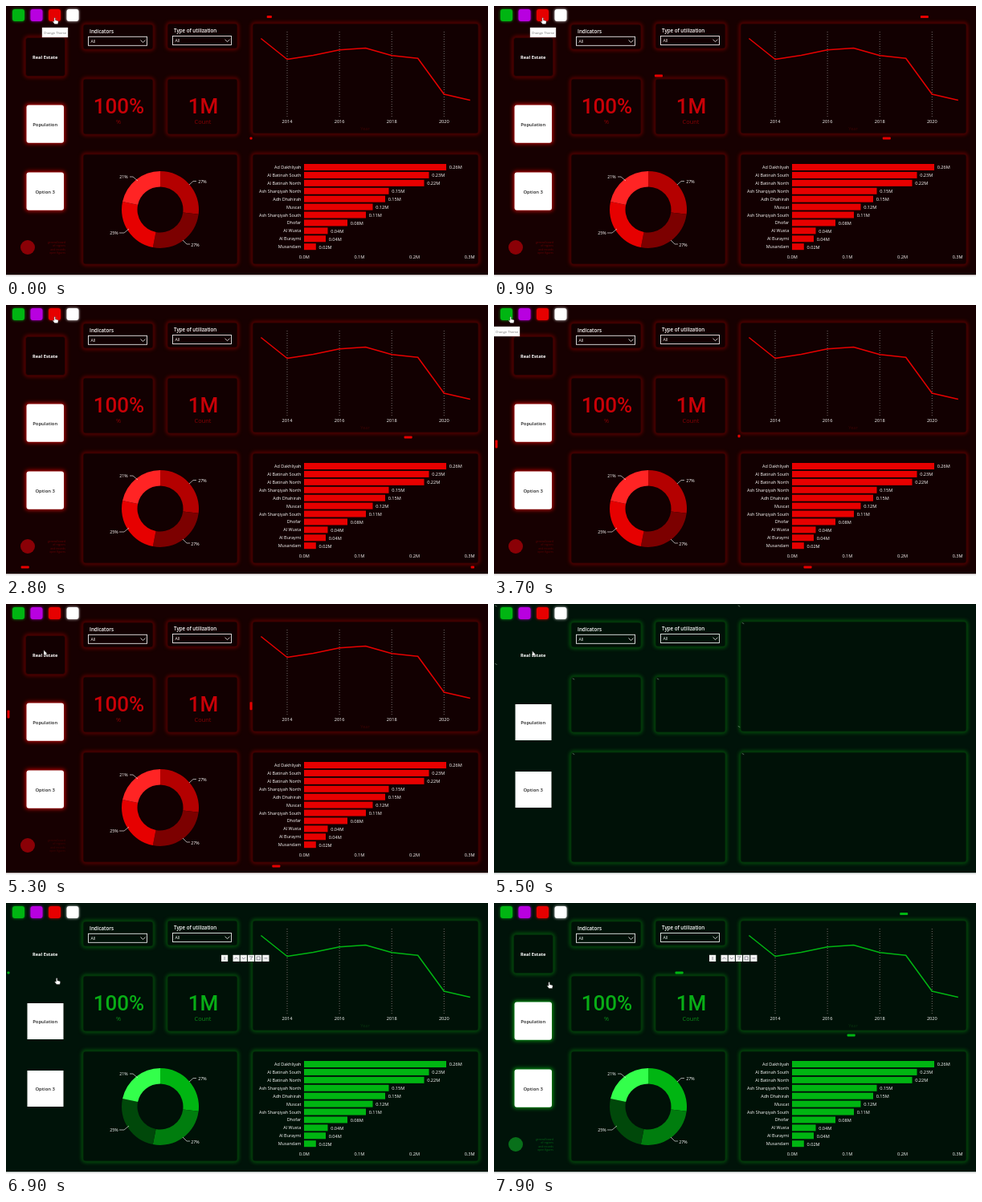
These frames come from a looping animation (600x338 px, 8000 ms). An HTML page:

```html
<!DOCTYPE html>
<html lang="en">
<head>
<meta charset="utf-8">
<title>Dashboard themes</title>
<style>
  html, body { margin: 0; width: 100%; height: 100%; overflow: hidden; background: #160001; }
  svg { display: block; width: 600px; height: 338px; font: 5.6px "Open Sans", "Noto Sans", sans-serif; }
  .red {
    --bg: #170001; --card: #120001; --glow: #6a0000; --edge: #380000; --main: #e60000;
    --kpi: #c90007; --dim: #860005; --faint: #3c0204; --tile: #e00000; --logo: #8a0006;
    --s0: #b40000; --s1: #7c0000; --s2: #e60000; --s3: #ff2424;
  }
  .green {
    --bg: #001309; --card: #001107; --glow: #045c0c; --edge: #033009; --main: #00b512;
    --kpi: #08ad16; --dim: #0a8a18; --faint: #06330e; --tile: #00b512; --logo: #08701a;
    --s0: #00b512; --s1: #007d0e; --s2: #00480a; --s3: #33ff4b;
  }
  text { fill: #fff; dominant-baseline: central; }
  .mid { text-anchor: middle; }
  .end { text-anchor: end; }
  .bold { font-weight: 600; }
  .glow { fill: none; stroke: var(--glow); stroke-width: 3.5; filter: blur(2.2px); }
  .card { fill: var(--card); stroke: var(--edge); stroke-width: .8; }
  .box { fill: none; stroke: #e8e8e8; stroke-width: .9; }
  .thin { fill: none; stroke: #ddd; stroke-width: .7; }
  .kpi { font: 500 26px Roboto, sans-serif; font-stretch: 80%; fill: var(--kpi); }
  .unit { font-size: 7.4px; fill: var(--dim); }
  .main { fill: var(--main); }
  .runner { fill: var(--main); }
</style>
</head>
<body>
<svg id="stage" class="red" viewBox="0 0 600 338" xmlns="http://www.w3.org/2000/svg"></svg>
<script>
const NS = 'http://www.w3.org/2000/svg';
const LOOP = 8000, STEP = 100;
const SWITCH = 5400, CHARTS = 6600, TILES = 7300;
const stage = document.getElementById('stage');

function el(parent, tag, attrs = {}, text) {
  const node = document.createElementNS(NS, tag);
  for (const key in attrs) node.setAttribute(key, attrs[key]);
  if (text !== undefined) node.textContent = text;
  parent.append(node);
  return node;
}
const group = (parent = stage) => el(parent, 'g');
const rect = (p, x, y, width, height, attrs) => el(p, 'rect', { x, y, width, height, ...attrs });
const label = (p, x, y, text, cls = '', style = '') => el(p, 'text', { x, y, class: cls, style }, text);
const path = (p, d, attrs) => el(p, 'path', { d, ...attrs });
const show = (node, on) => node.setAttribute('visibility', on ? 'visible' : 'hidden');

// Linear interpolation over rows of [time, ...values].
function sample(rows, t) {
  let i = rows.findIndex(row => row[0] > t);
  if (i < 0) return rows[rows.length - 1].slice(1);
  if (i === 0) return rows[0].slice(1);
  const a = rows[i - 1], b = rows[i], k = (t - a[0]) / (b[0] - a[0]);
  return a.slice(1).map((v, n) => v + (b[n + 1] - v) * k);
}

// Page and cards
rect(stage, 0, 0, 600, 338, { fill: 'var(--bg)' });
const cards = [
  [96, 23, 87, 31], [201, 22, 87, 31], [96, 91, 87, 69], [201, 91, 87, 69],
  [307, 22, 281, 137], [96, 185, 192, 137], [307, 185, 281, 137]
];
for (const [x, y, w, h] of cards) {
  rect(stage, x, y, w, h, { rx: 3, class: 'glow' });
  rect(stage, x, y, w, h, { rx: 3, class: 'card' });
}

// Theme buttons
['#00b512', '#b800e0', '#e60000', '#ffffff'].forEach((fill, i) => {
  const x = 8 + i * 22.5;
  rect(stage, x - .5, 3.5, 16, 16, { rx: 4, fill, opacity: .65, style: 'filter:blur(1.8px)' });
  rect(stage, x, 4, 15, 15, { rx: 3, fill });
});

// Filters
function filter(x, y, title) {
  label(stage, x + 1.5, y - 7.3, title, 'bold', 'font-size:6.2px');
  rect(stage, x, y, 73, 11, { class: 'box' });
  label(stage, x + 3, y + 5.7, 'All', '', 'font-size:5.2px');
  path(stage, `M${x + 65} ${y + 4.2}l3 3l3-3`, { class: 'thin', style: 'stroke-width:.9' });
}
filter(102.5, 38.3, 'Indicators');
filter(207.5, 37.5, 'Type of utilization');

// Charts
const charts = group();
label(charts, 140.5, 125, '100%', 'kpi mid');
label(charts, 140, 144.3, '%', 'unit mid');
label(charts, 245.5, 125, '1M', 'kpi mid');
label(charts, 245, 144.3, 'Count', 'unit mid');

[2014, 2016, 2018, 2020].forEach((year, i) => {
  const x = 350 + i * 65.1;
  path(charts, `M${x} 32V138`, { stroke: '#8d8585', 'stroke-width': .8, 'stroke-dasharray': '1 2' });
  label(charts, x, 143.7, year, 'mid');
});
label(charts, 447, 152.8, 'Year', 'mid', 'fill:var(--faint)');
const trend = [40.5, 66.5, 61.5, 54.8, 52.5, 61.8, 65.2, 110, 117.5];
el(charts, 'polyline', {
  points: trend.map((y, i) => `${317.4 + i * 32.55},${y}`).join(' '),
  fill: 'none', stroke: 'var(--main)', 'stroke-width': 1.5, 'stroke-linejoin': 'round'
});

const polar = (r, deg) => {
  const a = deg * Math.PI / 180;
  return `${192 + r * Math.sin(a)} ${254 + r * -Math.cos(a)}`;
};
[0, 97, 191, 282].forEach((from, i, all) => {
  const to = all[i + 1] || 360;
  path(charts, `M${polar(48, from)}A48 48 0 0 1 ${polar(48, to)}L${polar(28.5, to)}A28.5 28.5 0 0 0 ${polar(28.5, from)}Z`,
    { fill: `var(--s${i})` });
});
const shares = [
  [244.5, 219, '27%', 'M228 223l5-4.5h4'], [235.5, 298, '27%', 'M220 292l5 5h4'],
  [134.5, 283, '25%', 'M153 278l-6 5h-6'], [146.5, 212.7, '21%', 'M164 218l-6-5h-4']
];
for (const [x, y, text, line] of shares) {
  label(charts, x, y, text, 'mid', 'font-size:5.3px');
  path(charts, line, { class: 'thin' });
}

const regions = [
  ['Ad Dakhliyah', 177, '0.26M'], ['Al Batinah South', 155.5, '0.23M'], ['Al Batinah North', 149.5, '0.22M'],
  ['Ash Sharqiyah North', 105.5, '0.15M'], ['Adh Dhahirah', 101, '0.15M'], ['Muscat', 85.5, '0.12M'],
  ['Ash Sharqiyah South', 77, '0.11M'], ['Dhofar', 54, '0.08M'], ['Al Wusta', 29.5, '0.04M'],
  ['Al Buraymi', 27, '0.04M'], ['Musandam', 14.8, '0.02M']
];
regions.forEach(([name, w, value], i) => {
  const y = 201 + i * 9.92;
  label(charts, 367.3, y, name, 'end', 'font-size:5.45px');
  rect(charts, 371, y - 4, w, 8, { class: 'main' });
  label(charts, 374.7 + w, y + .3, value);
});
['0.0M', '0.1M', '0.2M', '0.3M'].forEach((text, i) => label(charts, 371.3 + i * 68.6, 313.3, text, 'mid'));

// Side menu
const plain = group(), lit = group();
rect(lit, 24, 39, 50, 49, { rx: 4, class: 'glow' });
rect(lit, 24.5, 39.5, 49, 48, { rx: 3, class: 'card' });
for (const y of [123.5, 207.5]) {
  rect(plain, 26.5, y + 1.5, 45, 45, { fill: '#fff' });
  rect(lit, 24, y - 1.5, 49.5, 50, { rx: 4, fill: 'var(--tile)', opacity: .8, style: 'filter:blur(2.6px)' });
  rect(lit, 25.5, y, 46.5, 47.3, { rx: 3, fill: '#fff' });
}
label(stage, 48.7, 63.8, 'Real Estate', 'mid bold', 'font-weight:700;font-size:5.7px');
const names = group();
label(names, 48.7, 148, 'Population', 'mid bold', 'fill:#222;font-size:5.9px');
label(names, 48.7, 232, 'Option 3', 'mid bold', 'fill:#222;font-size:5.9px');

// Emblem
el(lit, 'circle', { cx: 27, cy: 301, r: 9, fill: 'var(--logo)' });
const motto = group(lit);
['general board', 'of regions', 'and records', 'open figures'].forEach((text, i) =>
  label(motto, 74, 294 + i * 4.6, text, 'end', 'font-size:3.4px;fill:var(--logo)'));

// Loading marks
const spots = [[2.5, 2.5], [2.5, 75], [305, 2.5], [305, 153], [99, 93.5], [204, 93.5], [310, 24], [99, 187], [310, 187]];
const loading = group();
const marks = spots.map(([x, y]) => path(loading, `M${x - 1} ${y + 1}l2-2`, { stroke: '#6f8a74', 'stroke-width': .7 }));

// Lights that run clockwise; rows hold [time, edge position], one unit per edge.
const lights = [
  { box: [305, 13.5, 590, 165], before: [[0, .08], [1800, 1.54], [3700, 3.01], [4000, 3.25]], after: [[6970, 0], [7900, .72]] },
  { box: [305, 165, 590, 327], before: [[0, 0], [1800, 1.29], [3700, 2.7], [4000, 2.89]], after: [[7250, 0], [7900, .49]] },
  { box: [3, 87, 287.5, 327], before: [[0, -.05], [1800, 1.47], [2850, 3], [3700, 3.64], [4000, 3.79]], after: [[6900, 0], [7900, .8]] }
];
for (const light of lights) light.node = rect(stage, 0, 0, 1, 1, { rx: .8, class: 'runner' });

function moveLight({ box: [l, t0, r, b], before, after, node }, t) {
  const rows = t < SWITCH ? before : after;
  const pos = sample(rows, t)[0];
  const on = pos >= 0 && t >= rows[0][0];
  show(node, on);
  if (!on) return;
  const side = Math.floor(pos) % 4, k = pos % 1, flat = side % 2 === 0;
  const x = [l + (r - l) * k, r, r - (r - l) * k, l][side];
  const y = [t0, t0 + (b - t0) * k, b, b - (b - t0) * k][side];
  // The light grows out of each corner.
  const len = Math.min(10, 3 + k * 40), w = flat ? len : 3, h = flat ? 3 : len;
  Object.entries({ x: x - w / 2, y: y - h / 2, width: w, height: h })
    .forEach(([key, v]) => node.setAttribute(key, v));
}

// Visual header buttons
const tools = group();
[268, 282.5, 291.7, 300.9, 310.1, 319.3].forEach((x, i) => {
  rect(tools, x, 64.8, 8.2, 8.2, { fill: '#f4f4f4' });
  const d = ['M0-2V2', 'M-2 1l2-2l2 2', 'M-2-1l2 2l2-2', 'M-2-2H2L0 0V2', 'M-2-2H2V2H-2Z', 'M-2 0H2'][i];
  path(tools, d, { transform: `translate(${x + 4.1} 68.9)`, fill: 'none', stroke: '#667', 'stroke-width': .7 });
});

// Page bottom
rect(stage, 0, 335.3, 600, 2.7, { fill: '#f3f3f3' });

// Tooltip and pointer
const tip = group();
rect(tip, 0, 27, 32, 12, { fill: '#fff', stroke: '#ccc', 'stroke-width': .4 });
label(tip, 16, 33.2, 'Change Theme', 'mid', 'fill:#777;font-size:4.1px');
const pointer = group();
const hand = path(pointer, 'M-1.6 .8V-3.6q.8-1 1.5 0V-.8l3 .7q.9.3.7 1.4L3 4H-1L-3.4 1q.4-1 1.8-.2Z',
  { fill: '#fff', stroke: '#333', 'stroke-width': .4 });
const arrow = path(pointer, 'M-1-3.6V3L.5 1.7L1.6 4L2.6 3.5L1.6 1.3H3.5Z',
  { fill: '#fff', stroke: '#333', 'stroke-width': .4 });
const route = [
  [0, 61.5, 18.5], [2800, 61.5, 18.5], [3300, 21.5, 18.5], [4600, 21.5, 18.5],
  [5200, 48, 61], [5400, 48, 61], [6300, 54.5, 72], [6900, 64, 97.5], [7900, 69.5, 102.5]
];

function draw(t) {
  const red = t < SWITCH, ready = red || t >= CHARTS, glowing = red || t >= TILES;
  stage.setAttribute('class', red ? 'red' : 'green');
  show(charts, ready);
  show(loading, !ready);
  show(lit, glowing);
  show(plain, !glowing && t >= SWITCH + STEP);
  show(names, red || t >= SWITCH + STEP);
  show(tools, t >= 6700);
  motto.setAttribute('opacity', .65 + .3 * Math.sin(t / 300));
  marks.forEach((mark, i) => mark.setAttribute('transform', `rotate(${(t - 6300) * .36} ${spots[i]})`));
  lights.forEach(light => moveLight(light, t));

  const [x, y] = sample(route, t);
  pointer.setAttribute('transform', `translate(${x} ${y})`);
  const pointing = t >= 4800 && t < 6600;
  show(hand, !pointing);
  show(arrow, pointing);
  show(tip, t < 2800 || (t >= 3500 && t < 4700));
  tip.setAttribute('transform', `translate(${t < 2800 ? 45 : 0} 0)`);
}

function tick() {
  draw(Math.floor(performance.now() % LOOP / STEP) * STEP);
  requestAnimationFrame(tick);
}
tick();
</script>
</body>
</html>
```
